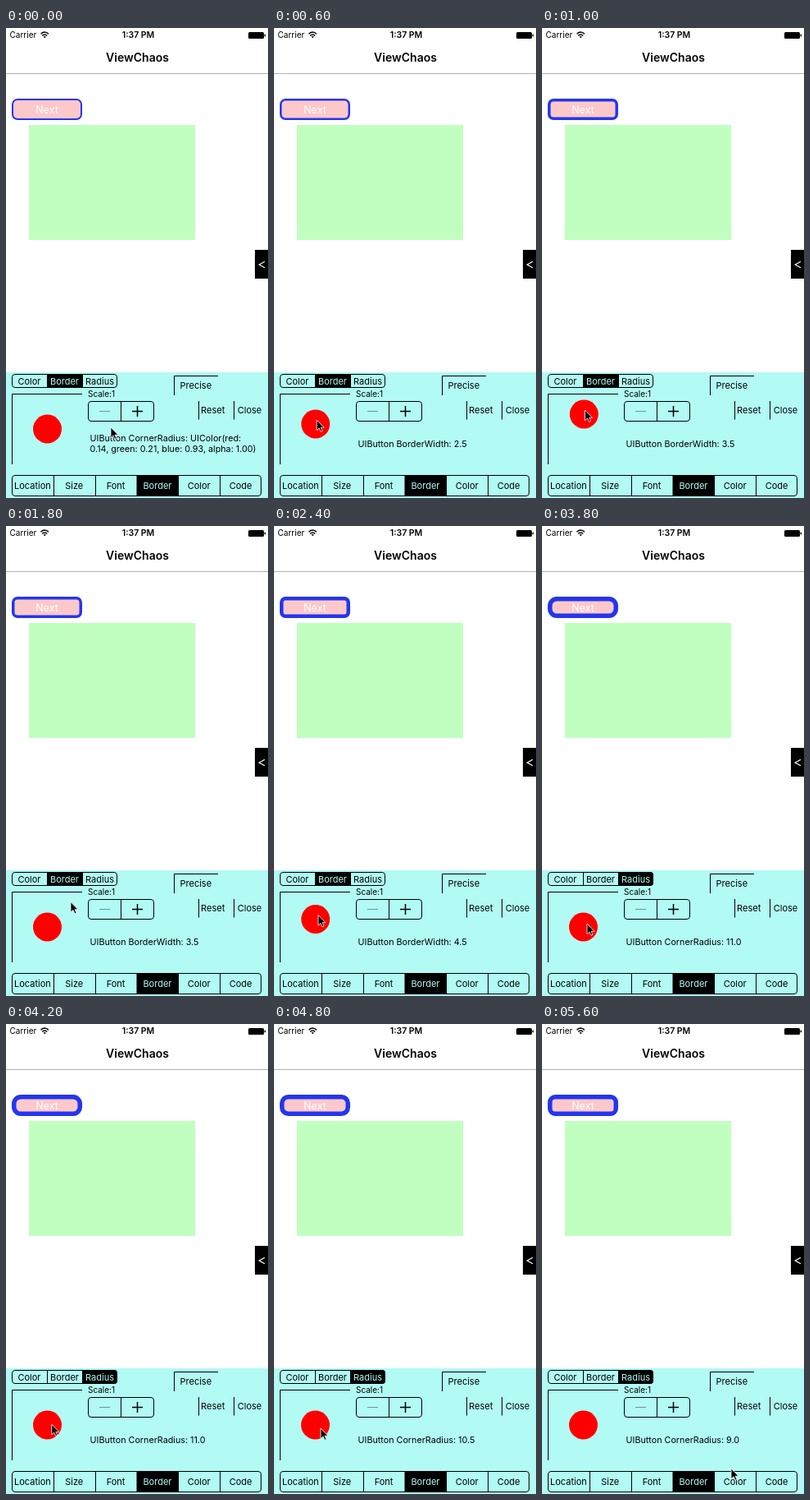
An HTML page for the animation above (5.8 s loop, 320 px wide and 572 px high).

```html
<!DOCTYPE html>
<html lang="en">
<head>
<meta charset="utf-8">
<title>ViewChaos</title>
<style>
  html, body { margin: 0; width: 100%; height: 100%; overflow: hidden; background: #fff; }
  svg { display: block; width: 320px; height: 572px; font: 11px Inter, Roboto, sans-serif; }
  .mid { text-anchor: middle; }
  .line { fill: none; stroke: #000; }
  .panel { fill: #b2faf4; }
  #label { font-size: 10.75px; }
</style>
</head>
<body>
<svg viewBox="0 0 320 572">
  <rect width="320" height="572" fill="#fff"/>

  <!-- status and navigation bars -->
  <text x="4.5" y="12" font-size="10">Carrier</text>
  <g fill="none" stroke="#000" stroke-width="1.5">
    <path d="M42.5 7.3Q47.3 2.8 52 7.3M44.3 9.4Q47.3 6.6 50.2 9.4"/>
    <path d="M45.6 10.6Q47.3 9.2 48.9 10.6L47.3 12.2Z" fill="#000" stroke="none"/>
  </g>
  <text class="mid" x="161.5" y="12" font-size="10.5" font-weight="600">1:37 PM</text>
  <rect x="296" y="5" width="19" height="8" rx="1.5"/>
  <rect x="315.6" y="7.5" width="1.4" height="3" rx=".7"/>
  <text class="mid" x="160.5" y="41" font-size="14" font-weight="600">ViewChaos</text>
  <path d="M0 55.5H320" stroke="#b2b2b2"/>

  <!-- inspected view -->
  <rect id="button" fill="#fdc8ca" stroke="#2436ed"/>
  <text class="mid" x="50" y="103.5" font-size="12.5" fill="#fff">Next</text>
  <rect x="28" y="118" width="203" height="140" fill="#c1ffc1"/>
  <rect x="304" y="270" width="16" height="35"/>
  <path d="M316 284.3L309.2 288L316 291.7" fill="none" stroke="#fff" stroke-width="1.2"/>

  <!-- tool panel -->
  <rect class="panel" y="419" width="320" height="153"/>
  <g id="modes"></g>
  <path class="line" d="M7.5 531V445.5H93"/>
  <text x="100" y="449" font-size="10">Scale:1</text>
  <rect class="line" x="100.5" y="454.5" width="80" height="24" rx="3.5"/>
  <path class="line" d="M140.5 454V479"/>
  <path d="M114 466.5H127" stroke="#6d9693"/>
  <path class="line" stroke-width="1.5" d="M154 466.5H167M160.5 460V473"/>
  <path class="line" d="M205.5 447V423.5H259M235.5 454V476.5M278.5 454V476.5"/>
  <text class="mid" x="231.8" y="439">Precise</text>
  <text class="mid" x="252.7" y="469">Reset</text>
  <text class="mid" x="297.5" y="469">Close</text>
  <text id="label"></text>
  <circle id="ball" r="17.5" fill="#f00"/>
  <g id="tabs"></g>

  <path id="cursor" d="M0 0V12.6L3 9.9L5 14.3L7 13.4L5.1 9.2H9Z" stroke="#fff" stroke-width=".8"/>
</svg>
<script>
const LOOP = 5800, STEP = 200;
const INK = [0, 0, 0], CYAN = [178, 250, 244];
const $ = id => document.getElementById(id);
const set = (el, attrs) => { for (const k in attrs) el.setAttribute(k, attrs[k]); };

function add(parent, tag, attrs, text = '') {
  const el = document.createElementNS('http://www.w3.org/2000/svg', tag);
  set(el, attrs);
  el.textContent = text;
  return parent.appendChild(el);
}

const mix = k => `rgb(${INK.map((c, i) => Math.round(c + (CYAN[i] - c) * k))})`;

// Segmented control; select(i, amount) fills one cell.
function segments(id, names, x, y, w, h) {
  const g = $(id), cw = w / names.length;
  const clip = add(g, 'clipPath', { id: id + 'Clip' });
  add(clip, 'rect', { x, y, width: w, height: h, rx: 4 });
  const inner = add(g, 'g', { 'clip-path': `url(#${id}Clip)` });
  const cells = names.map((name, i) => {
    const left = x + cw * i;
    const box = add(inner, 'rect', { x: left, y, width: cw, height: h });
    if (i) add(inner, 'path', { class: 'line', d: `M${Math.round(left) + .5} ${y}v${h}` });
    const text = add(g, 'text', { class: 'mid', x: left + cw / 2, y: y + h / 2 + 4 }, name);
    return { box, text };
  });
  add(g, 'rect', { class: 'line', x: x + .5, y: y + .5, width: w - 1, height: h - 1, rx: 3.5 });
  return amounts => cells.forEach(({ box, text }, i) => {
    const a = amounts[i] || 0;
    set(box, { fill: mix(1 - a) });
    set(text, { fill: mix(a) });
  });
}

const setMode = segments('modes', ['Color', 'Border', 'Radius'], 7, 421, 129, 17);
const setTab = segments('tabs', ['Location', 'Size', 'Font', 'Border', 'Color', 'Code'], 7, 544, 305, 26);
setTab([0, 0, 0, 1]);

// Linear interpolation through [step, ...values] points.
function track(points, n) {
  const j = points.findIndex(p => p[0] >= n);
  if (j < 1) return points[j < 0 ? points.length - 1 : 0].slice(1);
  const a = points[j - 1], b = points[j], k = (n - a[0]) / (b[0] - a[0]);
  return a.slice(1).map((v, i) => v + (b[i + 1] - v) * k);
}

const pointer = [[0, 128, 486], [2, 52, 483], [5, 52.5, 465], [6, 53, 463], [9, 79, 457.5],
  [11, 54, 483], [13, 54, 464], [14, 112, 430], [15, 97, 459], [17, 55, 484],
  [18, 55, 472], [19, 55, 484], [24, 57, 492], [26, 57, 504], [28, 231, 541]];
const pull = [[2, 0, 0], [5, .8, -18], [6, 0, 0], [11, 0, 0], [13, .5, -19], [14, 0, 0],
  [17, 0, 0], [18, 0, -12], [19, 0, 0], [24, 0, 0], [26, 0, 12], [27, 0, 0]];
const border = [[2, 2], [5, 3.5], [11, 3.5], [13, 5.5]];
const corner = [[16, 7], [19, 11], [23, 11], [24, 10.5], [26, 9]];
const half = v => Math.round(v * 2) / 2;

function showLabel(lines) {
  const el = $('label');
  el.textContent = '';
  lines.forEach((s, i) =>
    add(el, 'tspan', { x: 102.5, y: lines.length > 1 ? 503 + 13 * i : 509.5 }, s));
}

function draw(n) {
  const w = half(track(border, n)[0]), r = half(track(corner, n)[0]);
  set($('button'), { x: 7 + w / 2, y: 86 + w / 2, width: 86 - w, height: 26 - w,
    rx: r - w / 2, 'stroke-width': w });

  const [dx, dy] = track(pull, n);
  set($('ball'), { cx: 50.5 + dx, cy: 488 + dy });
  set($('cursor'), { transform: `translate(${track(pointer, n)})` });

  setMode(n < 15 ? [0, 1] : n === 15 ? [0, .52, .54] : [0, 0, 1]);
  showLabel(n < 3
    ? ['UIButton CornerRadius: UIColor(red:', '0.14, green: 0.21, blue: 0.93, alpha: 1.00)']
    : n < 17 ? [`UIButton BorderWidth: ${w.toFixed(1)}`]
    : [`UIButton CornerRadius: ${r.toFixed(1)}`]);
}

const start = performance.now();
let last = -1;
function tick() {
  const n = Math.floor((performance.now() - start) % LOOP / STEP);
  if (n !== last) draw(last = n);
  requestAnimationFrame(tick);
}
tick();
</script>
</body>
</html>
```
